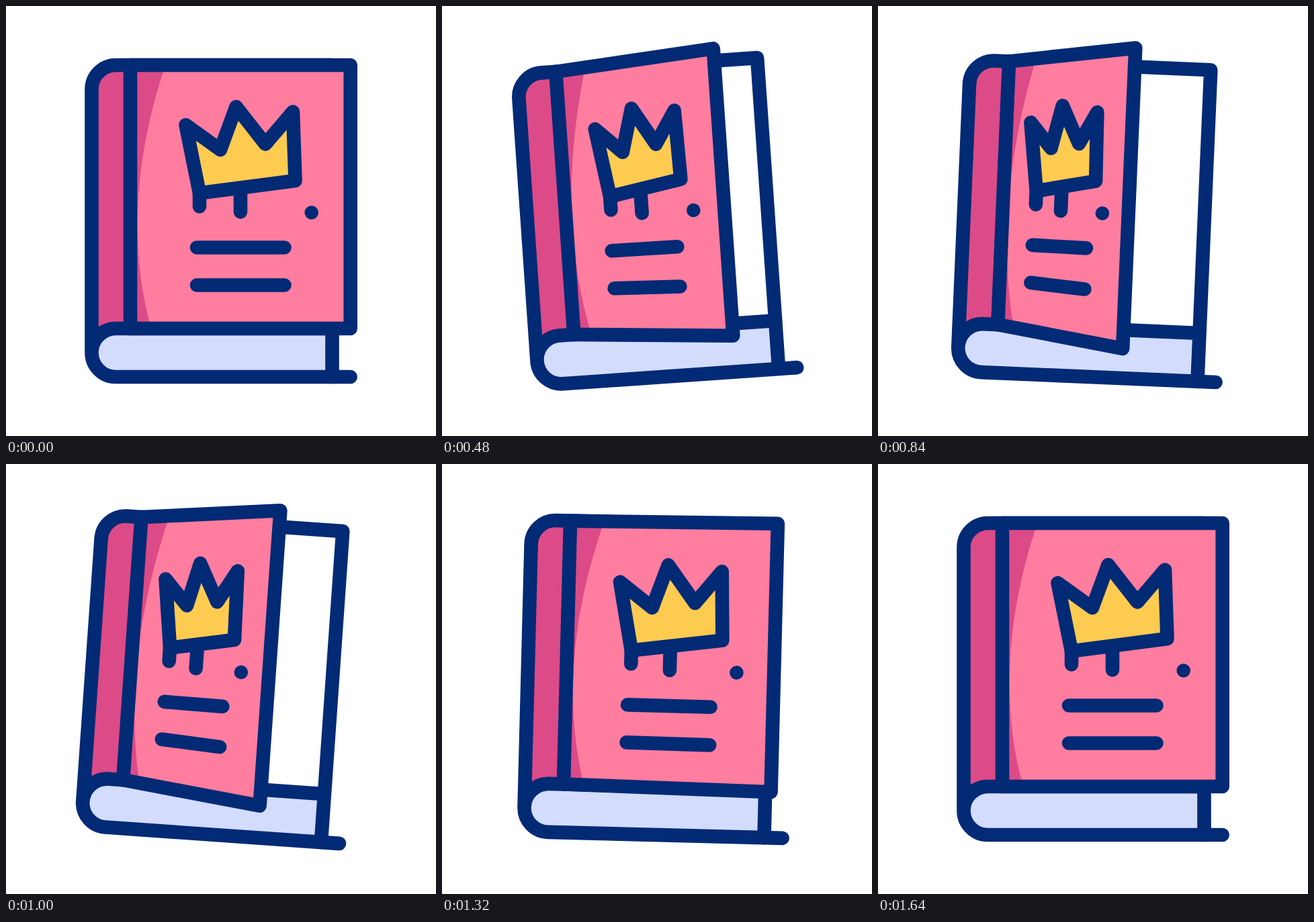
Write an HTML page that moves like this. It is 640 px wide and 640 px high and loops after 1720 ms.

```html
<!DOCTYPE html>
<html lang="en">
<head>
<meta charset="utf-8">
<title>Book</title>
<style>
  html, body { margin: 0; width: 100%; height: 100%; overflow: hidden; background: #fff; }
  svg { display: block; width: 100%; height: 100%; }
  .line { fill: none; stroke: #032a75; stroke-width: 20.6; stroke-linecap: round; stroke-linejoin: round; }
  #crown { fill: #fecb51; }
</style>
</head>
<body>
<svg viewBox="0 0 640 640">
  <g id="book">
    <!-- pages -->
    <path fill="#d3dcfd" d="M163.5 480H485.5V552H163.5A36 36 0 0 1 163.5 480Z"/>
    <path class="line" d="M185 88H485.5V552M185 480H485.5"/>
    <!-- spine -->
    <path fill="#dc4b87" d="M127.5 516V124A36 36 0 0 1 163.5 88H185V480H163.5A36 36 0 0 0 127.5 516Z"/>
    <!-- cover -->
    <path id="cover" fill="#ff7d9f"/>
    <path id="shade" fill="#dc4b87"/>
    <path id="edge" class="line"/>
    <path class="line" d="M185 480H163.5A36 36 0 0 0 127.5 516V124A36 36 0 0 1 163.5 88H185V480M127.5 516A36 36 0 0 0 163.5 552H512.7"/>
    <path id="crown" class="line"/>
    <path id="marks" class="line"/>
  </g>
</svg>
<script>
const LOOP = 1720, STEP = 40, SPAN = 1600;
const HINGE = 185, WIDTH = 327.7, TOP = 88, BOTTOM = 480;

const $ = id => document.getElementById(id);
const set = (id, d) => $(id).setAttribute('d', d);
const clamp = x => Math.min(1, Math.max(0, x));
const ease = x => x < .5 ? Math.pow(2 * x, 2.2) / 2 : 1 - Math.pow(2 - 2 * x, 2.2) / 2;

function draw(t) {
  const u = clamp((Math.floor(t / STEP) - 1) * STEP / SPAN);
  const ramp = (a, b) => ease(clamp((u - a) / (b - a)));
  const tilt = -4 * ramp(0, .3) + 8 * ramp(.309, .592) - 4 * ramp(.615, .943);
  const open = ramp(.008, .473) - ramp(.478, .922);

  // Opening narrows the board and lifts its free edge towards the viewer.
  const right = HINGE + WIDTH * (1 - .43 * open), rise = 28 * open;
  const board = `M${HINGE} ${TOP}L${right} ${TOP - rise}V${BOTTOM + rise}L${HINGE} ${BOTTOM}`;
  set('cover', board + 'Z');
  set('edge', board);

  const sx = x => HINGE + (x - HINGE) * (1 - .26 * open);
  set('shade', `M${HINGE} ${TOP}H${sx(237)}C${sx(190)} 230 ${sx(183)} 360 ${sx(216)} ${BOTTOM}H${HINGE}Z`);

  // Printed shapes squeeze sideways around x = 147; dy is a drop when open.
  const at = (x, y, dy = .5) => `${147.4 + (x - 147.4) * (1 - .386 * open)} ${y + dy * open}`;
  const stroke = (...pts) => 'M' + pts.map(p => at(...p)).join('L');
  const rule = (y, drop) => stroke([284, y, .2], [414.5, y, drop]);

  set('crown', stroke([267.5, 177], [319, 214], [342.5, 150], [386, 205.5],
    [427, 157.5], [430.5, 260], [288, 278.5]) + 'Z');
  set('marks', stroke([288, 278], [288, 298.5]) + stroke([349, 271], [349, 306.5]) +
    stroke([454.7 - 5 * open, 307.5], [454.7 - 5 * open, 307.5]) +
    rule(359.5, 1.3) + rule(415.5, 6.4));

  $('book').setAttribute('transform', `rotate(${tilt} 320 320)`);
}

const start = performance.now();
function tick() {
  draw((performance.now() - start) % LOOP);
  requestAnimationFrame(tick);
}
tick();
</script>
</body>
</html>
```
